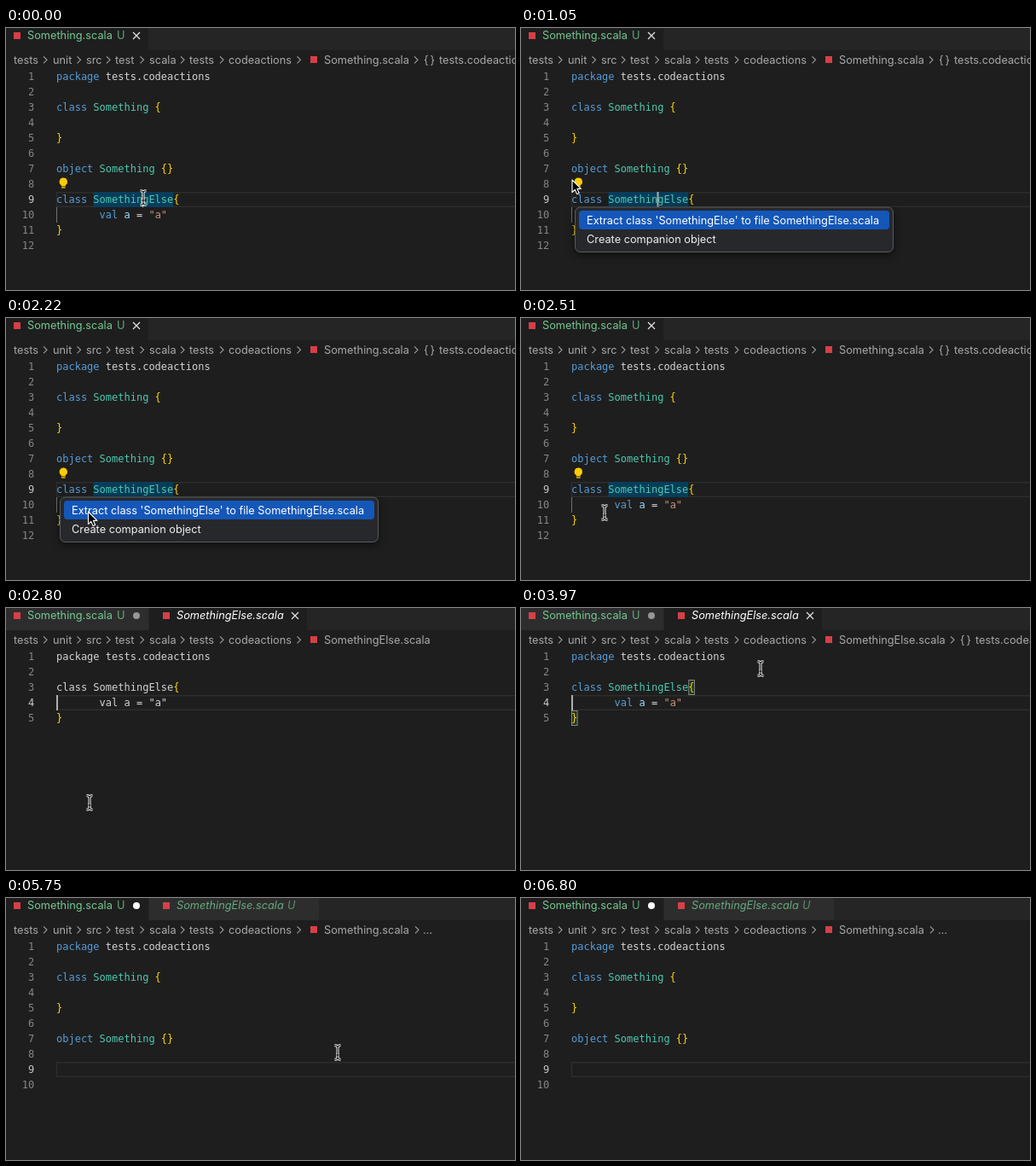
Write an HTML page that moves like this. It is 597 px wide and 307 px high and loops after 6820 ms.

```html
<!DOCTYPE html>
<html lang="en">
<head>
<meta charset="utf-8">
<title>Extract class to file</title>
<style>
  html, body { margin: 0; width: 100%; height: 100%; overflow: hidden; background: #1e1e1e; }
  svg { display: block; width: 597px; height: 307px; }
  text { white-space: pre; font: 12.75px Inter, "Open Sans", sans-serif; }
  .code text { font: 12px "DejaVu Sans Mono", "Liberation Mono", monospace; }
  .crumbs text { fill: #a9a9a9; }
  .italic { font-style: italic; }
</style>
</head>
<body>
<svg id="stage" viewBox="0 0 597 307" xmlns="http://www.w3.org/2000/svg"></svg>
<script>
const LOOP = 6820, CW = 7.224, LEFT = 59, ROW = 18;
const COLORS = {
  k: '#569cd6', t: '#4ec9b0', b: '#ffd700', s: '#ce9178', v: '#9cdcfe', p: '#d4d4d4'
};
const GREEN = '#73c991', RED = '#d73f46';
const stage = document.getElementById('stage');

const esc = s => s.replace(/&/g, '&amp;').replace(/</g, '&lt;').replace(/>/g, '&gt;');
const text = (x, y, s, attrs = '') => `<text x="${x}" y="${y}" ${attrs}>${esc(s)}</text>`;
const rect = (x, y, w, h, attrs) => `<rect x="${x}" y="${y}" width="${w}" height="${h}" ${attrs}/>`;
const path = (d, attrs) => `<path d="${d}" ${attrs}/>`;
const group = (id, body, cls = '') => `<g id="${id}" class="${cls}">${body}</g>`;
const icon = (x, y) => rect(x, y, 8, 8, `fill="${RED}"`);
const rowTop = n => 48 + (n - 1) * ROW;

// A line is a list of [kind, string] tokens; plain drops all colours but the braces.
function codeLine(n, tokens, plain) {
  const spans = tokens.map(([kind, s]) =>
    `<tspan fill="${COLORS[plain && kind !== 'b' ? 'p' : kind]}">${esc(s)}</tspan>`).join('');
  return `<text x="${LEFT}" y="${rowTop(n) + 13}">${spans}</text>`;
}

function numbers(count, active) {
  let out = '';
  for (let n = 1; n <= count; n++) {
    out += text(33.3, rowTop(n) + 13, String(n),
      `text-anchor="end" fill="${n === active ? '#c6c6c6' : '#858585'}"`);
  }
  return out;
}

const activeRow = n =>
  rect(LEFT + .5, rowTop(n) + .75, 560, 16.5, 'fill="none" stroke="#2d2d2d" stroke-width="1.5"');

const PACKAGE = [['k', 'package'], ['p', ' tests.codeactions']];
const ELSE = [['k', 'class '], ['t', 'SomethingElse'], ['b', '{']];
const VAL = [['k', '       val '], ['v', 'a'], ['p', ' = '], ['s', '"a"']];
const END = [['b', '}']];
const BASE = {
  1: PACKAGE,
  3: [['k', 'class '], ['t', 'Something '], ['b', '{']],
  5: END,
  7: [['k', 'object '], ['t', 'Something '], ['b', '{}']]
};

const file = (lines, count, active, plain) => numbers(count, active) +
  Object.entries(lines).map(([n, t]) => codeLine(+n, t, plain)).join('');

const bulb =
  path('M67.3 175.6a4.6 4.6 0 0 0-2.5 8.5v1.4h5v-1.4a4.6 4.6 0 0 0-2.5-8.5z', 'fill="#ffcc00"') +
  path('M65 187h4.6', 'stroke="#ffcc00" stroke-width="1.3"');

function editors() {
  const small = { 1: PACKAGE, 3: ELSE, 4: VAL, 5: END };
  const brace = (col, n) => rect(LEFT + col * CW + .5, rowTop(n) + .5, CW - .6, 17,
    'fill="#1d3420" stroke="#888" stroke-width="1"');
  return group('full',
      activeRow(9) +
      rect(LEFT + 6 * CW, rowTop(9), 13 * CW, ROW, 'fill="#083d5a"') +
      rect(LEFT, rowTop(10), 1, ROW, 'fill="#707070"') +
      file({ ...BASE, 9: ELSE, 10: VAL, 11: END }, 12, 9) + bulb, 'code') +
    group('plain', activeRow(4) + file(small, 5, 4, true), 'code') +
    group('colored', activeRow(4) + group('braces', brace(19, 3) + brace(0, 5)) +
      file(small, 5, 4), 'code') +
    group('rest', activeRow(9) + file(BASE, 10, 9), 'code');
}

const chevron = x => path(`M${x - 2} 33.3l4 4-4 4`, 'fill="none" stroke="#a0a0a0" stroke-width="1.1"');

function crumbs() {
  const parts = [[9, 'tests'], [55, 'unit'], [94, 'src'], [128, 'test'], [168, 'scala'],
    [215, 'tests'], [261, 'codeactions']];
  const seps = [46, 85.5, 120, 159.5, 207, 253, 343.5];
  const symbol = x => chevron(x - 9) + text(x, 41.8, '{}', 'letter-spacing="2"') +
    text(x + 18, 41.8, 'tests.codeactions');
  return group('crumbs',
    parts.map(([x, s]) => text(x, 41.8, s)).join('') + seps.map(chevron).join('') + icon(357, 33) +
    group('nameA', text(373, 41.8, 'Something.scala')) +
    group('nameB', text(373, 41.8, 'SomethingElse.scala')) +
    group('symbolA', symbol(490)) +
    group('symbolB', symbol(515)) +
    group('dots', chevron(482) + text(489, 41.8, '…')), 'crumbs');
}

const cross = x => path(`M${x - 4} 5l8 8m0-8l-8 8`, 'fill="none" stroke="#e4e4e4" stroke-width="1.2"');

function tabs() {
  const bg = (x, w, on) => rect(x, 0, w, 26, `fill="${on ? '#1e1e1e' : '#2d2d2d'}"`);
  const label = (x, s, attrs) => text(x, 13.4, s, attrs);
  const dot = fill => `<circle cx="153" cy="9" r="4" fill="${fill}"/>`;
  return rect(0, 0, 597, 26, 'fill="#252526"') +
    group('firstOn', bg(0, 167, true)) +
    group('firstOff', bg(0, 167, false)) +
    icon(9, 5) + label(25, 'Something.scala', `fill="${GREEN}"`) +
    label(130, 'U', `fill="${GREEN}" opacity=".8"`) +
    group('closeA', cross(153)) +
    group('dirtyOff', dot('#969696')) +
    group('dirtyOn', dot('#fff')) +
    group('secondOn', bg(168, 185, true) +
      label(200, 'SomethingElse.scala', 'class="italic" fill="#fff"') + cross(339) + icon(184, 5)) +
    group('secondOff', bg(168, 199, false) + icon(184, 5) +
      group('newName', label(200, 'SomethingElse.scala', 'class="italic" fill="#a0a0a0"')) +
      group('newGreen', `<g opacity=".8">${
        label(200, 'SomethingElse.scala', `class="italic" fill="${GREEN}"`)}${
        label(330, 'U', `class="italic" fill="${GREEN}" opacity=".8"`)}</g>`));
}

const menu = () => group('menu',
  rect(63.5, 210, 373, 52.5, 'rx="6" fill="#27282c" stroke="#5b5c5f" style="filter:drop-shadow(0 3px 5px #0008)"') +
  rect(68, 214, 364, 22, 'rx="4" fill="#1457b9"') +
  text(77, 230, "Extract class 'SomethingElse' to file SomethingElse.scala", 'fill="#fff"') +
  text(77, 252, 'Create companion object', 'fill="#f0f0f0"'));

const BEAM = 'M-3.5-8.2Q0-8.2 0-6Q0-8.2 3.5-8.2M0-6V6M-3.5 8.2Q0 8.2 0 6Q0 8.2 3.5 8.2M-2 3H2';
const cursors = () =>
  group('arrow', path('M0 0V14.5L3.3 11.4 5.6 16.6 8.2 15.5 5.9 10.4H10.4Z',
    'fill="#000" stroke="#fff" stroke-width="1.1" stroke-linejoin="round"')) +
  group('beam', path(BEAM, 'fill="none" stroke="#fff" stroke-width="3"') +
    path(BEAM, 'fill="none" stroke="#000" stroke-width="1.1"'));

stage.innerHTML = rect(0, 0, 597, 307, 'fill="#1e1e1e"') + tabs() + crumbs() + editors() +
  rect(0, 0, 2, ROW, 'id="caret" fill="#aeafad"') + menu() + cursors();

// Start time and the layers visible from then on.
const SCENES = [
  [0, 'firstOn closeA nameA symbolA full'],
  [900, 'firstOn closeA nameA symbolA full menu'],
  [2370, 'firstOn closeA nameA symbolA full'],
  [2660, 'firstOff dirtyOff secondOn nameB plain'],
  [2950, 'firstOff dirtyOff secondOn nameB colored'],
  [3100, 'firstOff dirtyOff secondOn nameB colored braces'],
  [3250, 'firstOff dirtyOff secondOn nameB symbolB colored braces'],
  [5160, 'firstOn dirtyOn secondOff newName nameA dots rest'],
  [5310, 'firstOn dirtyOn secondOff newGreen nameA dots rest']
].map(([at, names]) => [at, names.split(' ')]);

// Start time, pointer shape, x, y.
const POINTER = [
  [0, 'beam', 161, 199], [300, 'beam', 140, 196], [450, 'beam', 100, 188],
  [600, 'arrow', 68, 177], [750, 'arrow', 60, 177], [900, 'arrow', 60, 178],
  [1190, 'arrow', 62, 184], [1340, 'arrow', 70, 200], [1490, 'arrow', 82, 215],
  [1640, 'arrow', 92, 224], [1780, 'arrow', 96.5, 227], [2370, 'beam', 98, 228],
  [2950, 'beam', 130, 195], [3100, 'beam', 215, 120], [3250, 'beam', 290, 62],
  [3390, 'arrow', 312, 16], [3540, 'arrow', 314, 10], [3680, 'arrow', 308, 22],
  [3830, 'beam', 292, 56], [3970, 'beam', 281, 71], [4270, 'arrow', 250, 44],
  [4410, 'arrow', 170, 20], [4560, 'arrow', 105, 10], [4710, 'arrow', 84, 8],
  [5750, 'beam', 389, 181], [5900, 'beam', 428, 222], [6050, 'beam', 466, 264],
  [6200, 'beam', 494, 298], [6350, '', 0, 0]
];

// Caret: from, to, x, row.
const CARET = [
  [0, 1190, 159.5, 9], [1780, 2220, 159.5, 9],
  [2660, 3390, LEFT, 4], [3830, 4270, LEFT, 4], [4710, 5160, LEFT, 4],
  [5310, 5750, LEFT, 9], [6200, 6800, LEFT, 9]
];

const el = Object.fromEntries([...stage.querySelectorAll('[id]')].map(e => [e.id, e]));
const layers = [...new Set(SCENES.flatMap(s => s[1]))];
const show = (e, on) => e.style.display = on ? '' : 'none';
const current = (table, t) => table.filter(s => s[0] <= t).pop();

function draw(t) {
  const visible = current(SCENES, t)[1];
  for (const id of layers) show(el[id], visible.includes(id));

  const [, shape, x, y] = current(POINTER, t);
  for (const id of ['arrow', 'beam']) {
    show(el[id], id === shape);
    el[id].setAttribute('transform', `translate(${x} ${y})`);
  }

  const caret = CARET.find(c => t >= c[0] && t < c[1]);
  show(el.caret, caret);
  if (caret) {
    el.caret.setAttribute('x', caret[2]);
    el.caret.setAttribute('y', rowTop(caret[3]));
  }
}

const start = performance.now();
function tick() {
  draw((performance.now() - start) % LOOP);
  requestAnimationFrame(tick);
}
tick();
</script>
</body>
</html>
```
